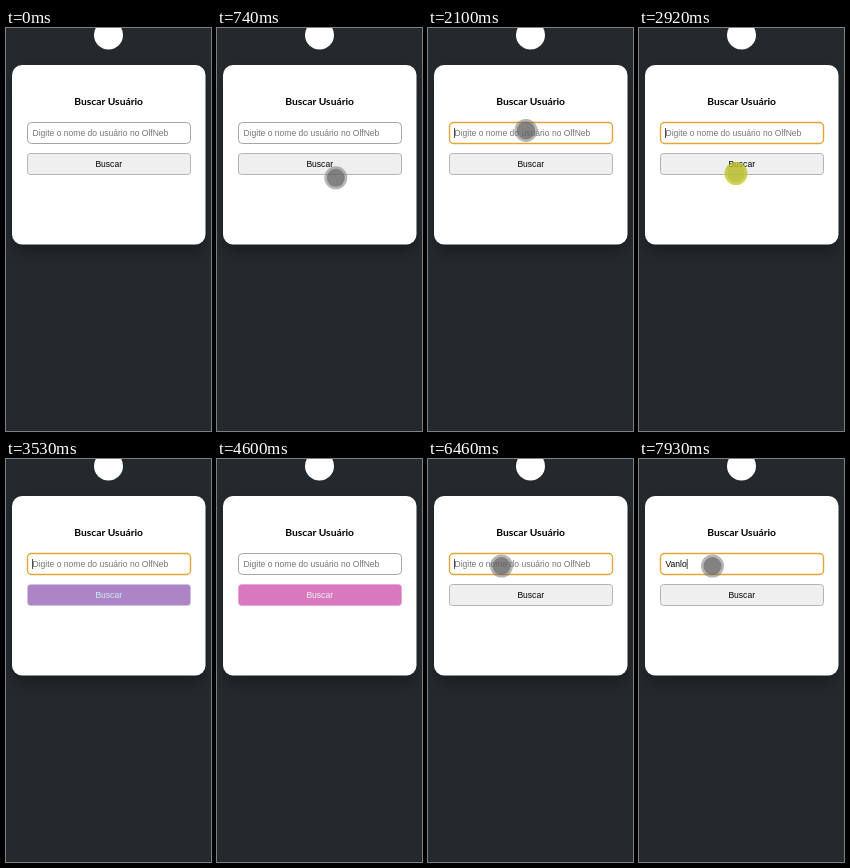
Animation of 205 by 403 pixels, one loop 8000 ms. Source, as an HTML page:

```html
<!DOCTYPE html>
<html lang="pt">
<head>
<meta charset="utf-8">
<title>Buscar Usuário</title>
<style>
  html, body { margin: 0; width: 100%; height: 100%; overflow: hidden; background: #24292d; }
  svg { display: block; width: 100%; height: 100%; }
  text { font: 8.56px "Liberation Sans", Arial, sans-serif; }
  .title { font: 700 10.3px Lato, sans-serif; }
  .mid { text-anchor: middle; }
</style>
</head>
<body>
<svg viewBox="0 0 205 403">
  <defs>
    <filter id="blur" x="-20%" y="-20%" width="140%" height="150%">
      <feGaussianBlur stdDeviation="7"/>
    </filter>
  </defs>
  <rect width="205" height="403" fill="#24292d"/>
  <rect x="8" y="46" width="190" height="178" rx="10" fill="#000" opacity=".28" filter="url(#blur)"/>
  <circle cx="102.5" cy="7" r="14.5" fill="#fff"/>
  <rect x="6" y="37" width="193.5" height="179.5" rx="10" fill="#fff"/>
  <text class="title mid" x="102.7" y="77">Buscar Usuário</text>

  <rect id="field" x="21.5" y="94.5" width="163" height="21" rx="4" fill="#fff"/>
  <text id="value" x="26.5" y="108"></text>
  <rect id="caret" y="100" width=".8" height="10" fill="#222"/>

  <rect id="button" x="21.5" y="125.5" width="163" height="21" rx="3"/>
  <text id="label" class="mid" x="102.7" y="139">Buscar</text>

  <g id="touch">
    <circle id="ring" r="11.5"/>
    <circle id="core" r="9"/>
  </g>
</svg>
<script>
const LOOP = 8000, STEP = 66.5;
const HINT = 'Digite o nome do usuário no OlfNeb';
const NAME = 'Vanlo';
const KEY_TIMES = [6660, 7060, 7470, 7730, 7930];

// time, x, y of the touch pointer
const PATH = [
  [66, 172, 374], [133, 155, 312], [199, 153, 255], [465, 153, 255],
  [600, 128, 163], [800, 114, 143], [1000, 102, 113], [1260, 98.3, 92],
  [1490, 98.3, 92], [1590, 98, 101], [2050, 98, 101], [2390, 97, 145],
  [2600, 97, 145], [2655, 97, 145.5], [3400, 97, 145.5], [3455, 120, 140],
  [4787, 151, 44], [4854, 128, 60], [4921, 100, 82], [4985, 85.5, 94],
  [5180, 85.5, 94], [5315, 73.5, 107]
];

// start time, fill, border, label colour
const BUTTON = [
  [0, '#efefef', '#b4b4b4', '#000'],
  [3050, '#ad85c7', '#c9c3e6', '#cdeef5'],
  [4600, '#d978be', '#e6a8d6', '#ecf6fa'],
  [4670, '#ff69b4', '#ffb5da', '#fff'],
  [5490, '#efefef', '#b4b4b4', '#000']
];

const $ = id => document.getElementById(id);
const within = (t, spans) => spans.some(([a, b]) => t >= a && t < b);
const set = (id, attrs) => {
  const el = $(id);
  for (const k in attrs) el.setAttribute(k, attrs[k]);
};

function pointerAt(t) {
  const q = Math.floor(t / STEP) * STEP;
  const i = PATH.findIndex(p => p[0] > q);
  if (i < 0) return PATH[PATH.length - 1].slice(1);
  if (i === 0) return PATH[0].slice(1);
  const a = PATH[i - 1], b = PATH[i];
  const f = (q - a[0]) / (b[0] - a[0]);
  return [a[1] + (b[1] - a[1]) * f, a[2] + (b[2] - a[2]) * f];
}

function drawField(t) {
  const focus = within(t, [[1900, 4600], [5490, LOOP]]);
  set('field', { stroke: focus ? '#e3a53a' : '#a6a6a6', 'stroke-width': focus ? 1.4 : 1 });

  const typed = NAME.slice(0, KEY_TIMES.filter(k => t >= k).length);
  const value = $('value');
  value.textContent = typed || HINT;
  set('value', { fill: typed ? '#000' : '#757575' });

  const on = within(t, [[1900, 2400], [2920, 4600], [5490, 5950], [6460, LOOP]]);
  const x = 26.2 + (typed ? value.getComputedTextLength() + .3 : 0);
  set('caret', { x, opacity: on ? 1 : 0 });
}

function drawButton(t) {
  const [, fill, stroke, ink] = BUTTON.filter(s => t >= s[0]).pop();
  set('button', { fill, stroke });
  set('label', { fill: ink });
}

function drawTouch(t) {
  const shown = within(t, [[68, 3530], [4805, LOOP]]);
  const down = within(t, [[1770, 1900], [2920, 3050], [5350, 5490]]);
  const [x, y] = pointerAt(t);
  set('touch', { transform: `translate(${x} ${y})`, opacity: shown ? 1 : 0 });
  set('ring', { fill: down ? 'rgba(192,196,30,.75)' : 'rgba(110,110,110,.5)' });
  set('core', { fill: down ? 'rgba(178,182,50,.45)' : 'rgba(95,95,95,.6)' });
}

const start = performance.now();
function frame() {
  const t = (performance.now() - start) % LOOP;
  drawField(t);
  drawButton(t);
  drawTouch(t);
  requestAnimationFrame(frame);
}
frame();
</script>
</body>
</html>
```
